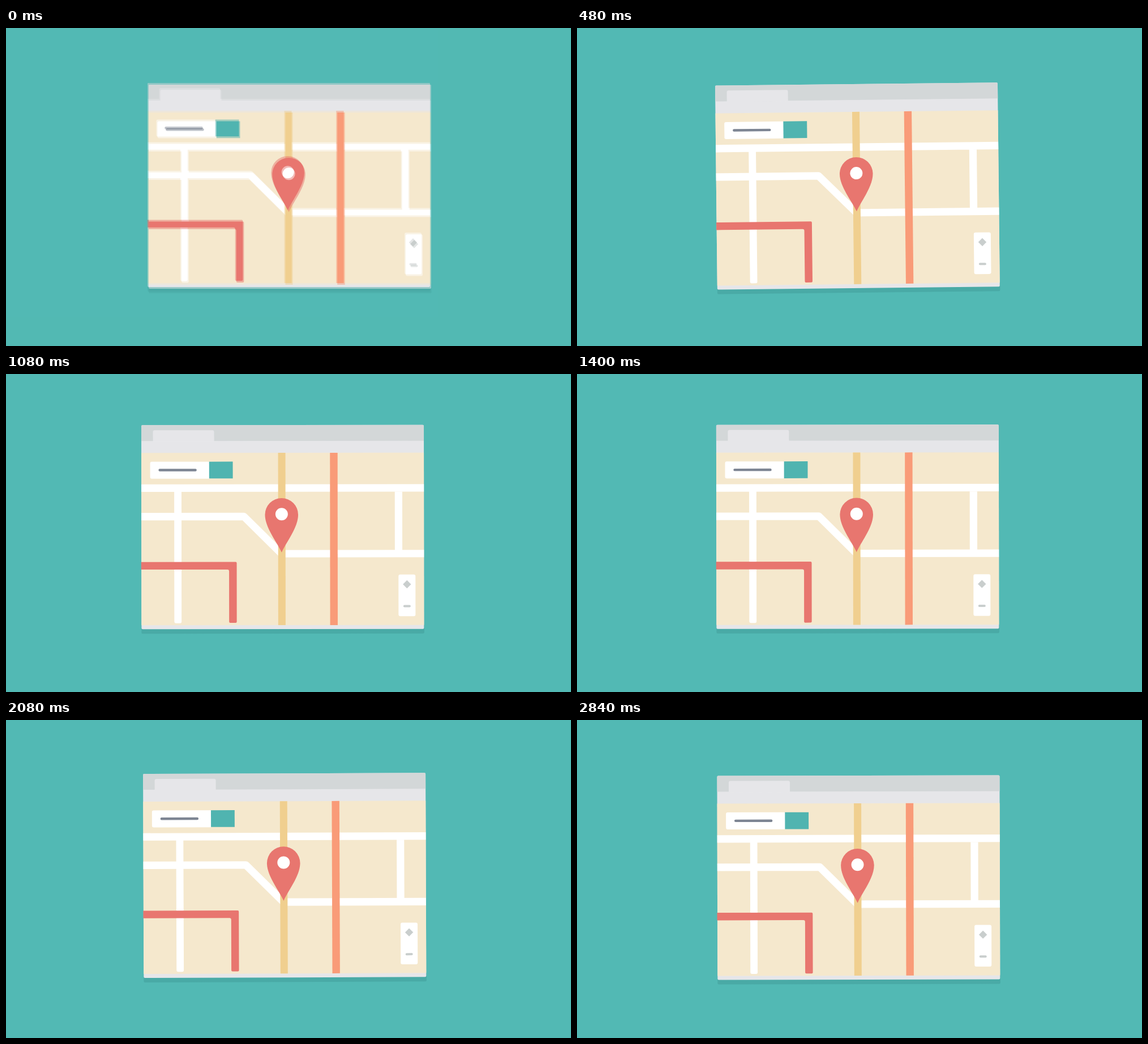
Animation of 998x561 px, one loop 2.88 s. Source, as an HTML page:

```html
<!DOCTYPE html>
<html lang="en">
<head>
<meta charset="utf-8">
<title>Shaking map window</title>
<style>
  html, body { margin: 0; width: 100%; height: 100%; overflow: hidden; background: #52b9b4; }
  svg { display: block; width: 100%; height: 100%; }
</style>
</head>
<body>
<svg viewBox="0 0 998 561">
  <defs>
    <g id="card" transform="translate(-249.5 -180)">
      <rect y="350" width="499.5" height="18" rx="2" fill="#49aaa6"/>
      <rect width="499" height="360" rx="2" fill="#e6e6e9"/>
      <path d="M0 28V2q0-2 2-2H497q2 0 2 2V28z" fill="#d3d7d8"/>
      <path d="M20.5 29V12q0-3 3-3h102q3 0 3 3v17z" fill="#e6e6e9"/>
      <rect y="49" width="499" height="304" fill="#f5e8cd"/>

      <g fill="none" stroke="#fff" stroke-width="13.2" stroke-linejoin="round">
        <path d="M0 111.2H499M454.2 111V227"/>
        <path d="M0 161.3H181L247.5 227H499"/>
      </g>
      <rect x="58" y="111" width="12.8" height="238.5" rx="3" fill="#fff"/>

      <rect x="241.5" y="49" width="13" height="304" fill="#f0cf8f"/>
      <rect x="333.2" y="49" width="13.4" height="304" fill="#f99b78"/>

      <g fill="#e8766f">
        <path d="M-.5 241.5H166.3q2 0 2 2V347q0 2-2 2h-9.5q-2 0-2-2V257.8q0-3-3-3H-.5z"/>
        <path d="M247.6 224.7C239.8 207 218.3 181 218.3 158.3a29.3 29.3 0 0 1 58.6 0C276.9 181 255.4 207 247.6 224.7z"/>
      </g>
      <circle cx="247.7" cy="157.2" r="11" fill="#fff"/>

      <rect x="15.5" y="64.5" width="106" height="30" rx="3" fill="#fff"/>
      <rect x="119.7" y="64.5" width="41.8" height="29.7" fill="#50b4b0"/>
      <path d="M32.5 79.3H95.5" stroke="#7d8593" stroke-width="4.4" stroke-linecap="round"/>

      <rect x="454" y="264" width="30" height="73.5" rx="3" fill="#fff"/>
      <path d="M469 274l7.2 7.2-7.2 7.2-7.2-7.2z" fill="#c9cecd"/>
      <path d="M464.5 319.7H473.5" stroke="#c9cecd" stroke-width="4" stroke-linecap="round"/>
    </g>
  </defs>
  <use id="main" href="#card"/>
  <g id="blend" opacity=".5">
    <rect width="998" height="561" fill="#52b9b4"/>
    <use id="ghost" href="#card"/>
  </g>
</svg>
<script>
const LOOP = 2880, STEP = 40;
const [main, blend, ghost] = ['main', 'blend', 'ghost'].map(id => document.getElementById(id));

// Rest poses of the shake, as offsets from the card's centre
const rests = [
  { t: 0, x: 2.5, y: 3.5, turn: 0 },
  { t: 480, x: -2.6, y: 3.9, turn: -.62 },
  { t: 1080, x: -9.3, y: -5, turn: -.06 },
  { t: 1720, x: 4.6, y: -6, turn: -.1 },
  { t: 2080, x: -5.8, y: -.8, turn: -.2 },
  { t: 2520, x: -.8, y: -1.8, turn: .03 },
  { t: 2840, x: -.6, y: 3, turn: -.14 }
];
const swing = { x: 6, y: 5, turn: .1 };

// Ease from rest to rest, with one full swing on the way
function poseAt(t) {
  const i = rests.findLastIndex(r => r.t <= t);
  const from = rests[i], to = rests[(i + 1) % rests.length];
  const u = (t - from.t) / ((to.t || LOOP) - from.t);
  const ease = u * u * (3 - 2 * u), sway = Math.sin(2 * Math.PI * u);
  const mix = k => from[k] + (to[k] - from[k]) * ease + swing[k] * sway;
  return { x: mix('x'), y: mix('y'), turn: mix('turn') };
}

function place(el, { x, y, turn }, dx = 0, dy = 0) {
  el.setAttribute('transform', `translate(${498 + x + dx} ${275 + y + dy}) rotate(${turn})`);
}

// The loop opens on a half-and-half blend of two poses
function draw(ms) {
  const t = Math.floor(ms % LOOP / STEP) * STEP;
  const pose = poseAt(t), half = t === 0 ? 1 : 0;
  blend.style.display = half ? '' : 'none';
  place(main, pose, -half, -1.5 * half);
  place(ghost, pose, half, 1.5 * half);
}

const start = performance.now();
function tick() {
  draw(performance.now() - start);
  requestAnimationFrame(tick);
}
tick();
</script>
</body>
</html>
```
